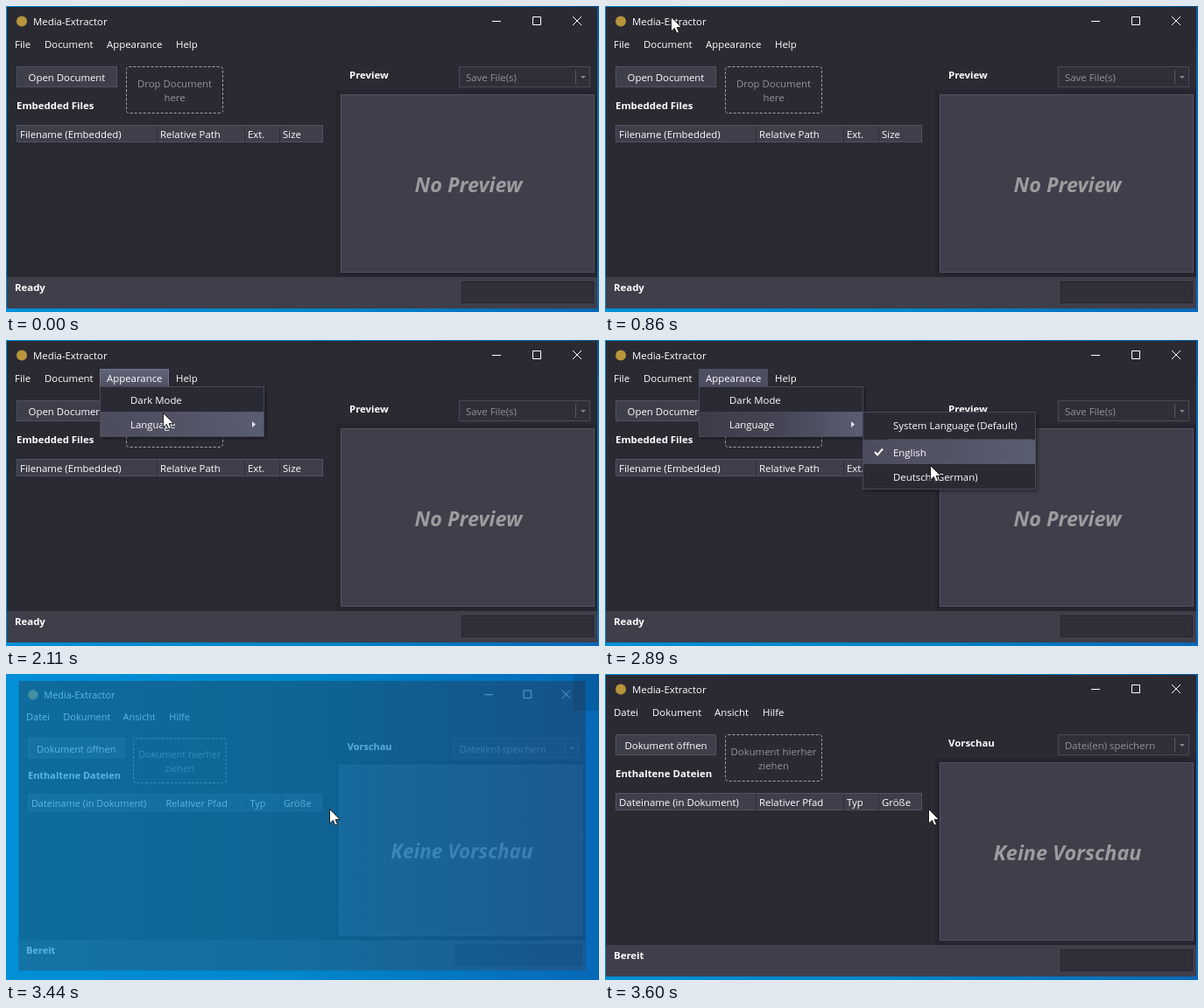
Animation of 677x350 px, one loop 4.3 s. Source, as an HTML page:

```html
<!DOCTYPE html>
<html lang="en">
<head>
<meta charset="utf-8">
<title>Language switch</title>
<style>
  html, body { margin: 0; width: 100%; height: 100%; overflow: hidden; background: #0078c8; }
  svg { display: block; width: 677px; height: 350px; }
  text { font: 11.4px "Open Sans", "Noto Sans", sans-serif; fill: #fff; }
  .bold { font-weight: 700; }
  .mid { text-anchor: middle; }
  .off { fill: #92929a; }
  .big { font: italic 700 23.4px "Open Sans", "Noto Sans", sans-serif; fill: #9c9c9e; text-anchor: middle; }
  .panel { fill: #3f3e4b; }
  .edge { fill: #3f3e4b; stroke: #525163; }
  .line { fill: none; stroke: #fff; }
  .popup { fill: #2b2b35; stroke: #4a4a5a; }
</style>
</head>
<body>
<svg viewBox="0 0 677 350">
  <defs>
    <linearGradient id="sky">
      <stop offset="0" stop-color="#0090d8"/>
      <stop offset=".5" stop-color="#0086cc"/>
      <stop offset="1" stop-color="#0868b8"/>
    </linearGradient>
    <linearGradient id="tab" x2="0" y2="1">
      <stop offset="0" stop-color="#626579"/>
      <stop offset="1" stop-color="#505263"/>
    </linearGradient>
    <linearGradient id="row">
      <stop offset="0" stop-color="#4b4c5c"/>
      <stop offset="1" stop-color="#5a5c70"/>
    </linearGradient>
    <linearGradient id="trail">
      <stop offset="0" stop-color="#3c3c49"/>
      <stop offset=".5" stop-color="#454655"/>
      <stop offset="1" stop-color="#5b5e73"/>
    </linearGradient>
    <filter id="shade" x="-10%" y="-10%" width="125%" height="130%">
      <feDropShadow dx="2" dy="2" stdDeviation="2" flood-opacity=".4"/>
    </filter>
  </defs>

  <rect width="677" height="350" fill="url(#sky)"/>
  <rect x="648" width="29" height="42" fill="#003c64" opacity=".25"/>

  <g id="app">
    <rect x="1" y="1" width="674" height="345" fill="#2b2a33"/>
    <circle cx="18" cy="17.5" r="6" fill="#b8953c"/>
    <path class="line" d="M555 17.5h10M601.5 12.5h9v9h-9zM647 12l10 10m0-10l-10 10"/>

    <rect id="docHover" x="36.5" y="33.5" width="70" height="20" fill="url(#tab)" stroke="#70738a"/>
    <rect id="viewHover" x="107.5" y="33.5" width="78" height="20" fill="url(#tab)" stroke="#70738a"/>

    <rect class="edge" x="12.5" y="69.5" width="114" height="23"/>
    <rect x="137.5" y="69.5" width="110" height="53" rx="3" fill="none" stroke="#a2a2a8" stroke-dasharray="3 2"/>
    <rect class="edge" x="12.5" y="136.5" width="349" height="19"/>
    <path d="M172.5 137v19M272.5 137v19M312.5 137v19" stroke="#2f2e39"/>

    <rect x="517.5" y="69.5" width="149" height="23" fill="#2f2e39" stroke="#4a4958"/>
    <path d="M650.5 73v16" stroke="#5a5a66"/>
    <path d="M656 80h6l-3 3z" fill="#85858e"/>

    <rect x="377" y="96" width="298" height="214" fill="#26252e"/>
    <rect class="edge" x="382.5" y="101.5" width="289" height="203"/>
    <rect class="panel" x="1" y="310" width="674" height="36"/>
    <rect x="520.5" y="315.5" width="150" height="24" fill="#302f3a" stroke="#25242d"/>
    <g id="labels"></g>
  </g>

  <g id="menu">
    <rect class="popup" x="107.5" y="53.5" width="187" height="57" filter="url(#shade)"/>
    <rect id="darkHover" x="108" y="54" width="186" height="28" fill="url(#row)"/>
    <rect id="langHover" x="108" y="82" width="186" height="28"/>
    <text x="142" y="73">Dark Mode</text>
    <text x="142" y="101">Language</text>
    <path d="M281 93l4 3.5-4 3.5z" fill="#e4e4ea"/>
  </g>

  <g id="sub">
    <rect class="popup" x="294.5" y="82.5" width="197" height="88" filter="url(#shade)"/>
    <path d="M322 113.5h166" stroke="#43434f"/>
    <rect id="subHover" x="295" width="196" height="28" fill="url(#row)"/>
    <path class="line" d="M308 128l3 3.5 6-7" stroke-width="2"/>
    <text x="329" y="102">System Language (Default)</text>
    <text x="329" y="133">English</text>
    <text x="329" y="161">Deutsch (German)</text>
  </g>

  <path id="cursor" d="M.5.5V17l3.9-3.6 2.5 5.7 2.6-1.1-2.4-5.6h5.2z" fill="#fff" stroke="#111" stroke-width=".9"/>
</svg>
<script>
const LOOP = 4300, START = 136, STEP = 78.6;
const $ = id => document.getElementById(id);

// class, baseline, English text and x, German text and x
const labels = [
  ["", 22, "Media-Extractor", 31, "Media-Extractor", 31],
  ["", 48, "File", 10, "Datei", 10],
  ["", 48, "Document", 44, "Dokument", 54],
  ["", 48, "Appearance", 115, "Ansicht", 125],
  ["", 48, "Help", 194, "Hilfe", 180],
  ["mid", 86, "Open Document", 69.5, "Dokument öffnen", 69.5],
  ["mid off", 93, "Drop Document", 192.5, "Dokument hierher", 192.5],
  ["mid off", 109, "here", 192.5, "ziehen", 192.5],
  ["bold", 118, "Embedded Files", 12, "Enthaltene Dateien", 12],
  ["", 151, "Filename (Embedded)", 16, "Dateiname (in Dokument)", 16],
  ["", 151, "Relative Path", 176, "Relativer Pfad", 176],
  ["", 151, "Ext.", 276, "Typ", 276],
  ["", 151, "Size", 316, "Größe", 316],
  ["bold", 83, "Preview", 392, "Vorschau", 392],
  ["off", 86, "Save File(s)", 525, "Datei(en) speichern", 525],
  ["big", 213, "No Preview", 528, "Keine Vorschau", 528],
  ["bold", 326, "Ready", 10, "Bereit", 10]
];

// cursor waypoints: step, x, y
const path = [
  [0, 659, 336], [2, 440, 225], [4, 225, 85], [5, 165, 42], [6, 135, 27],
  [7, 108, 17], [9, 75, 12], [10, 74, 25], [11, 88, 41], [12, 116, 46],
  [13, 138, 43], [14, 144, 40], [16, 148, 47], [18, 154, 62], [20, 167, 77],
  [21, 174, 82], [22, 178, 83], [23, 178, 83], [24, 177, 82], [25, 179, 83],
  [27, 179, 83], [30, 255, 97], [32, 320, 108], [34, 361, 130],
  [35, 371, 143], [37, 369, 154]
];

const texts = labels.map(([cls, y]) => {
  const el = document.createElementNS("http://www.w3.org/2000/svg", "text");
  el.setAttribute("class", cls);
  el.setAttribute("y", y);
  return $("labels").appendChild(el);
});

let german = null;
function setLanguage(on) {
  if (on === german) return;
  german = on;
  texts.forEach((el, i) => {
    const [text, x] = labels[i].slice(on ? 4 : 2);
    el.textContent = text;
    el.setAttribute("x", x);
  });
}

function pointAt(k) {
  const i = path.findIndex(p => p[0] >= k);
  if (i < 0) return path[path.length - 1].slice(1);
  const b = path[i], a = path[i - 1] || b;
  const f = b[0] > a[0] ? (k - a[0]) / (b[0] - a[0]) : 0;
  return [1, 2].map(n => Math.round(a[n] + (b[n] - a[n]) * f));
}

const within = (k, a, b) => k >= a && k <= b;
const show = (id, opacity) => $(id).setAttribute("opacity", +opacity);

function popupOpacity(k, open) {
  if (k < open || k > 40) return 0;
  return k === open ? .45 : k === 39 ? .5 : k === 40 ? .15 : 1;
}

function draw(t) {
  const k = Math.floor((t - START) / STEP);
  show("cursor", k >= 0);
  $("cursor").setAttribute("transform", `translate(${pointAt(Math.max(k, 0))})`);

  const nested = k >= 28;
  show("docHover", k === 11);
  show("viewHover", k === 5 || within(k, 12, 38));
  $("viewHover").setAttribute("fill", nested ? "#4d4f61" : "url(#tab)");
  $("viewHover").setAttribute("stroke", nested ? "#4d4f61" : "#70738a");

  show("menu", popupOpacity(k, 14));
  show("darkHover", within(k, 18, 20));
  show("langHover", k >= 21);
  $("langHover").setAttribute("fill", nested ? "url(#trail)" : "url(#row)");

  show("sub", popupOpacity(k, 28));
  show("subHover", k >= 32);
  $("subHover").setAttribute("y", k < 33 ? 84 : k < 36 ? 114 : 142);

  // the window reopens in the other language
  setLanguage(k >= 42);
  const scale = k === 42 ? .96 : k === 43 ? .994 : 1;
  show("app", k === 42 ? .35 : k === 43 ? .85 : 1);
  $("app").setAttribute("transform", `translate(338 174) scale(${scale}) translate(-338 -174)`);
}

function tick() {
  draw(performance.now() % LOOP);
  requestAnimationFrame(tick);
}
tick();
</script>
</body>
</html>
```
